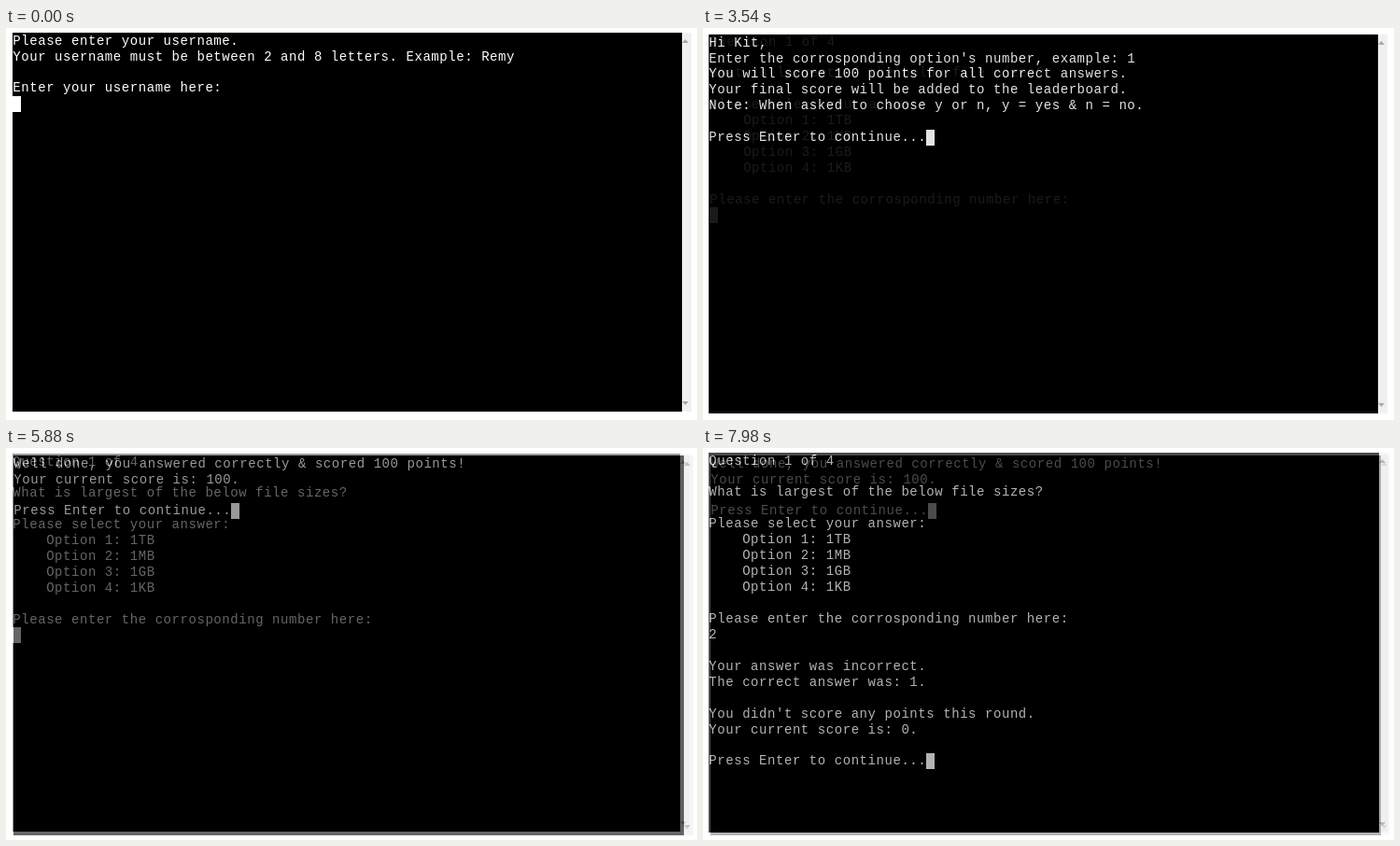
These frames come from a looping animation (740x420 px, 8 s). An HTML page:

```html
<!DOCTYPE html>
<html lang="en">
<head>
<meta charset="utf-8">
<title>Terminal quiz</title>
<style>
  html, body { margin: 0; width: 100%; height: 100%; overflow: hidden; background: #fff; }
  #stage { position: relative; width: 740px; height: 420px; overflow: hidden; }
  .scene { position: absolute; inset: 0; background: #fff; }
  .scene * { position: absolute; }
  .screen { background: #000; }
  pre {
    margin: 0; left: 0.3px; top: 0.6px; color: #fff;
    font: 14px/16.93px "Liberation Mono", "Courier New", monospace;
    letter-spacing: 0.56px;
  }
  .cursor { width: 9px; height: 17px; background: #fff; }
  .bar { width: 10px; background: #f0f0f0; }
  .arrow { left: 0; width: 7px; height: 4px; background: #a6a6a6; }
  .up { top: 7px; clip-path: polygon(50% 0, 100% 100%, 0 100%); }
  .down { bottom: 7px; clip-path: polygon(0 0, 100% 0, 50% 100%); }
</style>
</head>
<body>
<div id="stage"></div>
<script>
const LOOP = 8000, STEP = 60, FADE_STEPS = 10;
const CHAR = 8.96, LINE = 16.93;

const question = `Question 1 of 4

What is largest of the below file sizes?

Please select your answer:
    Option 1: 1TB
    Option 2: 1MB
    Option 3: 1GB
    Option 4: 1KB

Please enter the corrosponding number here:
`;

// box: left, top, right, bottom of the black screen
const scenes = [
  { start: -LOOP, box: [7, 5, 724, 411], text: `Please enter your username.
Your username must be between 2 and 8 letters. Example: Remy

Enter your username here:
` },
  { start: 1500, box: [6, 7, 723, 413], text: `Hi Kit,
Enter the corrosponding option's number, example: 1
You will score 100 points for all correct answers.
Your final score will be added to the leaderboard.
Note: When asked to choose y or n, y = yes & n = no.

Press Enter to continue...` },
  { start: 3540, box: [7, 6, 722, 411], text: question },
  { start: 5580, box: [8, 8, 726, 415], text: `Well done, you answered correctly & scored 100 points!
Your current score is: 100.

Press Enter to continue...` },
  { start: 7620, box: [6, 5, 724, 412], text: question + `2

Your answer was incorrect.
The correct answer was: 1.

You didn't score any points this round.
Your current score is: 0.

Press Enter to continue...` },
];

function add(parent, tag, className, style = {}) {
  const el = document.createElement(tag);
  el.className = className;
  for (const key in style) el.style[key] = style[key] + "px";
  return parent.appendChild(el);
}

function build({ box: [left, top, right, bottom], text }) {
  const scene = add(document.getElementById("stage"), "div", "scene");
  const height = bottom - top;
  const screen = add(scene, "div", "screen", { left, top, width: right - left, height });
  add(screen, "pre", "").textContent = text;

  const lines = text.split("\n");
  add(screen, "div", "cursor", {
    left: Math.round(lines.at(-1).length * CHAR),
    top: Math.round((lines.length - 1) * LINE),
  });

  const bar = add(scene, "div", "bar", { left: right, top, height });
  add(bar, "div", "arrow up");
  add(bar, "div", "arrow down");
  return scene;
}

const layers = scenes.map(build);

function draw() {
  const t = performance.now() % LOOP;
  scenes.forEach(({ start }, i) => {
    const step = Math.floor((t - start) / STEP) + 1;
    layers[i].style.opacity = Math.max(0, Math.min(FADE_STEPS, step)) / FADE_STEPS;
  });
  requestAnimationFrame(draw);
}
draw();
</script>
</body>
</html>
```
